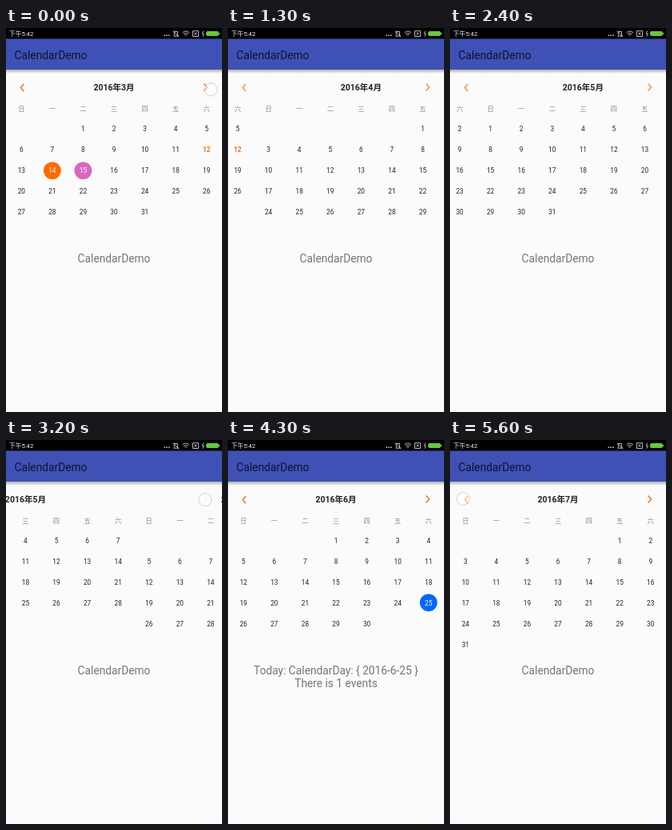
These frames come from a looping animation (270x480 px, 6 s). An HTML page:

```html
<!DOCTYPE html>
<html lang="zh">
<head>
<meta charset="utf-8">
<style>
html, body { margin: 0; width: 100%; height: 100%; overflow: hidden; background: #fafafa; }
svg { display: block; width: 100vw; height: 100vh; }
text { font-family: Roboto, "Noto Sans CJK SC", "Noto Sans CJK", sans-serif; }
.mid { text-anchor: middle; }
.head { font-size: 10.5px; font-weight: 700; fill: #222; }
.week { font-size: 8.25px; fill: #888; }
.day { font-size: 8.25px; fill: #222; }
.large { font-size: 13.75px; }
</style>
</head>
<body>
<svg id="stage" viewBox="0 0 270 480">
  <defs>
    <linearGradient id="shade" x2="0" y2="1">
      <stop offset="0" stop-color="#000" stop-opacity=".3"/>
      <stop offset="1" stop-color="#000" stop-opacity="0"/>
    </linearGradient>
  </defs>
  <rect width="270" height="480" fill="#fafbfa"/>
  <g id="pages"></g>
  <rect id="press" x="239" y="63" width="22" height="22" rx="1" fill="#000" fill-opacity=".08"/>
  <g id="arrows" fill="none" stroke="#ee8133" stroke-width="1.7">
    <path d="M22.3 70 18.4 74.6 22.3 79.2"/>
    <path d="M247.6 69.5 251.5 74 247.6 78.5"/>
  </g>
  <g class="mid large" fill="#757575">
    <text id="line1" x="135" y="292.6"/>
    <text id="line2" x="135" y="308.7"/>
  </g>
  <rect y="52" width="270" height="5" fill="url(#shade)"/>
  <rect y="13" width="270" height="39" fill="#3f51b5"/>
  <text class="large" x="10.6" y="38.7" fill="#10142b">CalendarDemo</text>
  <rect width="270" height="13.5" fill="#000"/>
  <text x="4" y="10" font-size="7.7" fill="#eee">下午5:42</text>
  <g fill="none" stroke="#ccc" stroke-width=".9">
    <path d="M197.5 9.3h1.6m1.2 0h1.6m1.2 0h1.6" stroke-width="1.5"/>
    <path d="M210 4.5h4.5v4.5l1.3 1.2h-6l.7-1.4zM209 3.5l7 7.5"/>
    <path d="M220.6 5.8q4.2-3.6 8.4 0M222 7.5q2.8-2.3 5.6 0M223.4 9.2q1.4-1.1 2.8 0"/>
    <path d="M233.5 3.7h7v6.8h-7zM235.4 5.5l3.2 3.2m0-3.2l-3.2 3.2"/>
    <path d="M247 3.5l-2 3.6h2.4l-1.6 3.6"/>
  </g>
  <rect x="250" y="4" width="16" height="6" rx="2.2" fill="#69c63c"/>
  <rect x="266.2" y="5.8" width="1.2" height="2.4" fill="#69c63c"/>
  <circle id="ring" r="8" fill="#fff" fill-opacity=".55" stroke="#888" stroke-opacity=".45" stroke-width=".8"/>
</svg>
<script>
const W = 270, LOOP = 6000, SLIDE = 500;
const el = id => document.getElementById(id);
const clamp = v => Math.max(0, Math.min(1, v));

const slides = [1125, 2225, 3150, 4974];
// start, end, x, y of each touch
const touches = [
  [-200, 900, 256, 77], [1600, 2000, 256, 77], [2800, 3300, 249, 74.5],
  [3500, 4100, 249.5, 202.5], [4800, 5100, 251, 73.5], [5500, 6200, 16.5, 73.5]
];
const marks = { '3-14': '#ff6a00', '3-15': '#d966bf', '6-25': '#58a177' };
const PICK = 4150, CLEAR = 5500;

function add(parent, tag, attrs, text) {
  const node = document.createElementNS('http://www.w3.org/2000/svg', tag);
  for (const k in attrs) node.setAttribute(k, attrs[k]);
  if (text !== undefined) node.textContent = text;
  parent.append(node);
  return node;
}

let picked;
const colX = c => W / 7 * (c + .5);

function buildPage(month) {
  const page = add(el('pages'), 'g', {});
  add(page, 'text', { class: 'mid head', x: 135, y: 77.7 }, `2016年${month}月`);
  [...'日一二三四五六'].forEach((name, c) =>
    add(page, 'text', { class: 'mid week', x: colX(c), y: 104.3 }, name));

  const first = new Date(2016, month - 1, 1).getDay();
  const count = new Date(2016, month, 0).getDate();
  for (let d = 1; d <= count; d++) {
    const cell = first + d - 1, x = colX(cell % 7);
    const y = 126 + 26 * Math.floor(cell / 7);
    const key = month + '-' + d, color = marks[key];
    if (color) {
      const dot = add(page, 'circle', { cx: x, cy: y - .5 + 2 * (month === 3) * .5 - .2, r: 10.9, fill: color });
      if (key === '6-25') picked = dot;
    }
    const label = add(page, 'text', { class: 'mid day', x, y: y + 2.8 }, d);
    if (color) label.style.fill = '#fff';
    if (key === '3-12') label.style.cssText = 'fill:#f0731c;font-weight:700';
  }
  return page;
}

const pages = [3, 4, 5, 6, 7].map(buildPage);

function draw(t) {
  const scroll = slides.reduce((sum, start) =>
    sum + 1 - (1 - clamp((t - start) / SLIDE)) ** 5, 0);
  pages.forEach((page, i) => {
    const x = (i - scroll) * W;
    page.setAttribute('transform', `translate(${x.toFixed(2)} 0)`);
    page.setAttribute('display', Math.abs(x) < W ? 'inline' : 'none');
  });
  el('arrows').setAttribute('opacity', Math.abs(1 - 2 * (scroll % 1)));

  let alpha = 0;
  for (const [from, to, x, y] of touches) {
    if (t < from || t >= to + 200) continue;
    alpha = Math.min(clamp((t - from + 100) / 200), clamp((to + 100 - t) / 200));
    el('ring').setAttribute('cx', x);
    el('ring').setAttribute('cy', y);
  }
  el('ring').setAttribute('opacity', alpha);
  el('press').setAttribute('opacity', t >= 4900 && t < 5200 ? 1 : 0);

  picked.setAttribute('fill', t >= PICK ? '#0066ff' : marks['6-25']);
  const open = t >= PICK && t < CLEAR;
  el('line1').textContent = open ? 'Today: CalendarDay: { 2016-6-25 }' : 'CalendarDemo';
  el('line2').textContent = open ? 'There is 1 events' : '';
}

const begin = performance.now();
function tick() {
  const t = (performance.now() - begin) % LOOP;
  draw(Math.floor(t / 100) * 100);
  requestAnimationFrame(tick);
}
draw(0);
requestAnimationFrame(tick);
</script>
</body>
</html>
```
